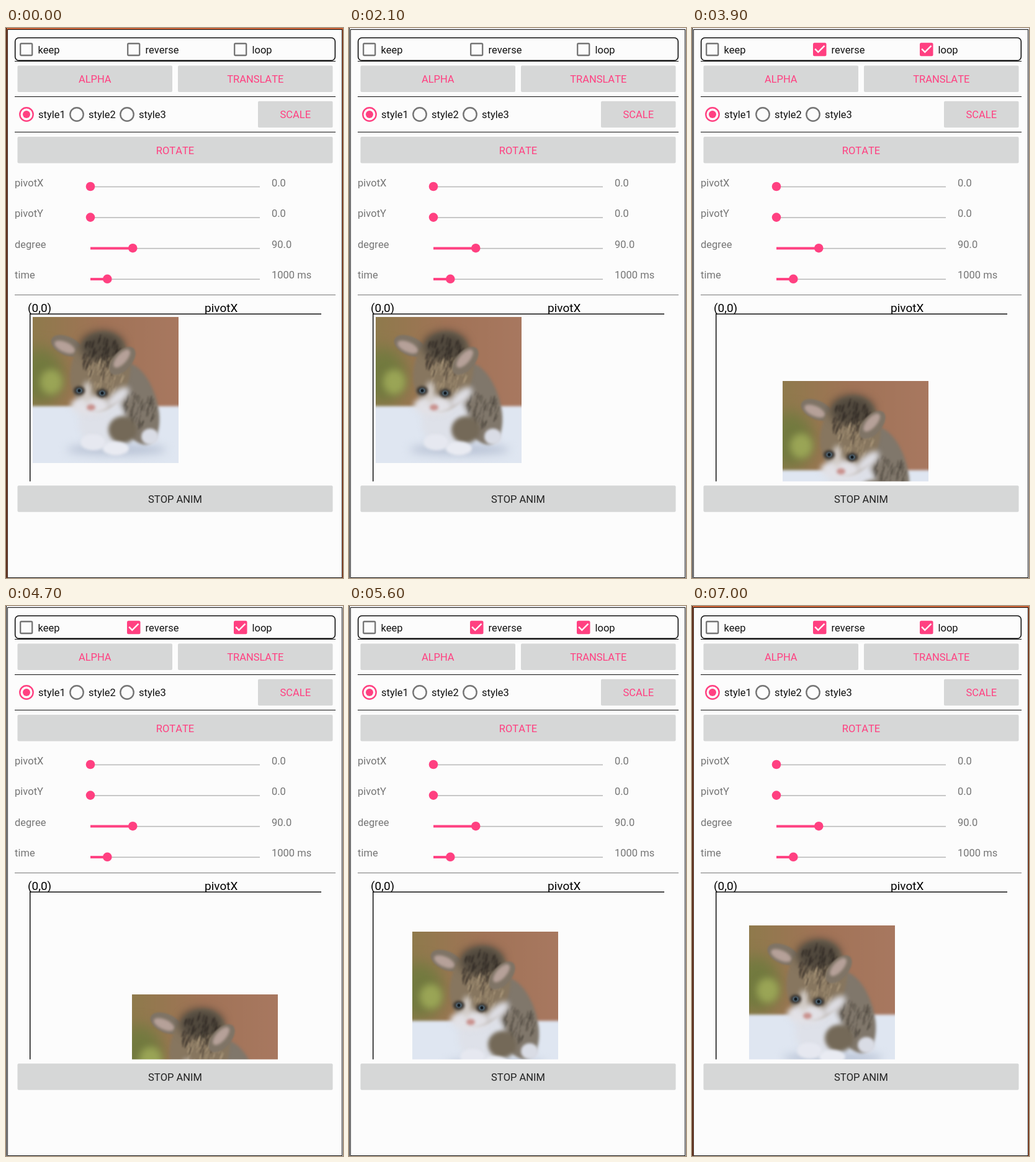
An HTML page with a canvas for the animation above (7100 ms loop, 543 by 885 pixels).

```html
<!DOCTYPE html>
<html lang="en">
<head>
<meta charset="utf-8">
<title>Tween demo</title>
<style>
html, body { margin: 0; width: 100%; height: 100%; overflow: hidden; background: #fcfcfc; }
canvas { display: block; }
</style>
</head>
<body>
<canvas id="stage" width="543" height="885"></canvas>
<script>
const ctx = document.getElementById('stage').getContext('2d');
const LOOP = 7100, STEP = 100, SIZE = 235;
const PINK = '#ff4081', GREY = '#757575', INK = '#111';

// One plain slide, then a repeating slide there and back with a short pause at each restart.
function offsetAt(t) {
  if (t < 2100) return Math.max(0, 0.244 * (t - 1118));
  if (t < 3500) return 0;
  const travel = (t - 3500) % 1870 * 0.258;
  return Math.max(0, SIZE - Math.abs(SIZE - travel));
}

function text(str, x, y, color, size = 16.5, align = 'left') {
  ctx.font = `${size}px Roboto, sans-serif`;
  ctx.fontKerning = 'none';
  ctx.textAlign = align;
  ctx.fillStyle = color;
  ctx.fillText(str, x, y);
}

function rect(x, y, w, h, color) {
  ctx.fillStyle = color;
  ctx.fillRect(x, y, w, h);
}

function rounded(x, y, w, h, r, color) {
  ctx.beginPath();
  ctx.roundRect(x, y, w, h, r);
  if (color) {
    ctx.fillStyle = color;
    ctx.fill();
  }
}

function stroke(color, width) {
  ctx.strokeStyle = color;
  ctx.lineWidth = width;
  ctx.stroke();
}

function circle(x, y, r) {
  ctx.beginPath();
  ctx.arc(x, y, r, 0, 7);
}

function disc(x, y, r) {
  circle(x, y, r);
  ctx.fillStyle = PINK;
  ctx.fill();
}

function button(label, x, y, w, color = PINK) {
  rounded(x, y, w, 42.5, 2, '#d6d7d7');
  text(label, x + w / 2, y + 27.5, color, 16.5, 'center');
}

function checkbox(label, x, checked) {
  if (checked) {
    rounded(x, 23.7, 21.5, 21.5, 2.5, PINK);
    ctx.beginPath();
    ctx.moveTo(x + 3.2, 33.7);
    ctx.lineTo(x + 8.3, 38.8);
    ctx.lineTo(x + 18.5, 28.6);
    stroke('#fff', 2.4);
  } else {
    rounded(x + 1.2, 25, 19, 19, 1.5);
    stroke(GREY, 2.3);
  }
  text(label, x + 29.5, 41, INK);
}

function radio(label, x, selected) {
  circle(x, 139, 10.7);
  stroke(selected ? PINK : GREY, 2.4);
  if (selected) disc(x, 139, 6);
  text(label, x + 19, 145, INK);
}

function slider(label, value, row, fraction) {
  const y = 255 + row * 49.6, left = 136, width = 273, filled = width * fraction;
  text(label, 14, y - 0.4, GREY);
  text(value, 428, y - 0.4, GREY);
  rect(left, y - 0.3, width, 1.6, '#bbb');
  rect(left, y - 1.7, filled, 4, PINK);
  disc(left + filled, y, 7.3);
}

// Soft stand-in for the photo: blurred patches of colour with a little seeded fur.
function paintKitten() {
  const layer = document.createElement('canvas');
  layer.width = layer.height = SIZE;
  const g = layer.getContext('2d');
  let seed = 7;
  const random = () => (seed = seed * 16807 % 2147483647) / 2147483647;

  function blob(x, y, rx, ry, color, blur = 2, turn = 0) {
    g.filter = `blur(${blur}px)`;
    g.fillStyle = color;
    g.beginPath();
    g.ellipse(x, y, rx, ry, turn, 0, 7);
    g.fill();
  }
  function fur(x, y, spread, color) {
    g.filter = 'blur(1px)';
    g.strokeStyle = color;
    g.lineWidth = 2;
    for (let i = 0; i < 70; i++) {
      const a = random() * 2 * Math.PI, r = spread * Math.sqrt(random());
      const px = x + r * Math.cos(a), py = y + r * Math.sin(a);
      g.beginPath();
      g.moveTo(px, py);
      g.lineTo(px - 3, py + 6 + 8 * random());
      g.stroke();
    }
  }
  function ear(tipX, tipY, baseX, baseY, turn) {
    g.save();
    g.translate((tipX + baseX) / 2, (tipY + baseY) / 2);
    g.rotate(turn);
    blob(0, 0, 27, 15, '#7f7466', 1);
    blob(-2, 3, 18, 8, '#b6a199', 2);
    g.restore();
  }

  const wall = g.createLinearGradient(0, 0, SIZE, 0);
  wall.addColorStop(0, '#8f7a4c');
  wall.addColorStop(0.5, '#a17357');
  wall.addColorStop(1, '#a87860');
  g.fillStyle = wall;
  g.fillRect(0, 0, SIZE, SIZE);
  blob(12, 95, 38, 45, '#727a3f', 12);
  blob(30, 105, 18, 20, '#9aa556', 6);
  g.filter = 'blur(2px)';
  g.fillStyle = '#dfe6f1';
  g.fillRect(-9, 144, SIZE + 18, 100);
  blob(135, 214, 80, 9, '#bac4d6', 7);

  blob(166, 140, 34, 68, '#80776b', 2, -0.3);
  fur(172, 145, 28, 'rgba(60,53,45,.3)');
  blob(112, 168, 38, 44, '#dee1e9', 4);
  blob(145, 182, 23, 22, '#746958', 3);
  blob(97, 202, 20, 13, '#e6e8f0');
  blob(134, 212, 21, 11, '#e9ebf2');
  blob(189, 193, 14, 13, '#d9dce5');

  ear(32, 40, 78, 54, 0.42);
  blob(109, 88, 48, 65, '#87765f', 2, 0.2);
  blob(112, 48, 36, 25, '#50483d', 7);
  fur(112, 60, 32, 'rgba(32,28,24,.4)');
  fur(118, 92, 30, 'rgba(190,168,138,.35)');
  ear(161, 50, 128, 92, 2.3);
  blob(93, 143, 32, 16, '#e2e1e6', 4);
  blob(88, 122, 7, 18, '#d5cfcb', 4);
  blob(137, 130, 23, 10, '#dedee4', 5, -0.7);
  for (const x of [75, 112]) {
    const y = 119 + (x - 75) / 9;
    blob(x, y, 9, 7, '#35312e');
    blob(x, y, 5, 4, '#536b7b', 1);
    blob(x, y, 2.5, 2.5, '#12181d', 0.6);
  }
  blob(94, 146, 7, 5, '#c9928e');
  return layer;
}

const kitten = paintKitten();

function windowFrame(active) {
  const edge = active ? '#cb6237' : '#ececf0';
  rect(0, 0, 543, 885, edge);
  rect(0, 0, 1, 885, INK);
  rect(2, 2, 540, 883, INK);
  rect(3, 3, 538, 881, '#fcfcfc');
}

function draw(t) {
  windowFrame(t < 1100 || t >= 7000);

  checkbox('keep', 22, false);
  checkbox('reverse', 195, t >= 3000);
  checkbox('loop', 367, t >= 2500);
  rounded(14.7, 15.8, 515.6, 36.4, 6);
  stroke(INK, 1.6);
  for (const y of [53, 110, 167]) rect(14, y, 517, 1, INK);
  rect(14, 429, 517, 1, '#777');

  button('ALPHA', 18.5, 60.5, 249.5);
  button('TRANSLATE', 277, 60.5, 249.5);
  button('SCALE', 406, 117.7, 120.5);
  button('ROTATE', 18.5, 175, 508);
  for (let i = 0; i < 3; i++) radio(`style${i + 1}`, 33 + i * 81, i === 0);

  slider('pivotX', '0.0', 0, 0);
  slider('pivotY', '0.0', 1, 0);
  slider('degree', '90.0', 2, 0.25);
  slider('time', '1000 ms', 3, 0.1);

  text('(0,0)', 35, 456.5, '#000', 19);
  text('pivotX', 320, 456.5, '#000', 19);
  rect(38, 459.5, 470, 1.5, INK);
  rect(38, 459.5, 1.5, 270, INK);

  const d = Math.round(offsetAt(t));
  ctx.save();
  ctx.beginPath();
  ctx.rect(39, 461, 492, 268.5);
  ctx.clip();
  ctx.drawImage(kitten, 43 + d, 464.5 + d);
  ctx.restore();
  button('STOP ANIM', 18.5, 736.3, 508, '#222');
}

const start = performance.now();
function tick() {
  const t = (performance.now() - start) % LOOP;
  draw(Math.floor(t / STEP) * STEP);
  requestAnimationFrame(tick);
}
tick();
</script>
</body>
</html>
```
